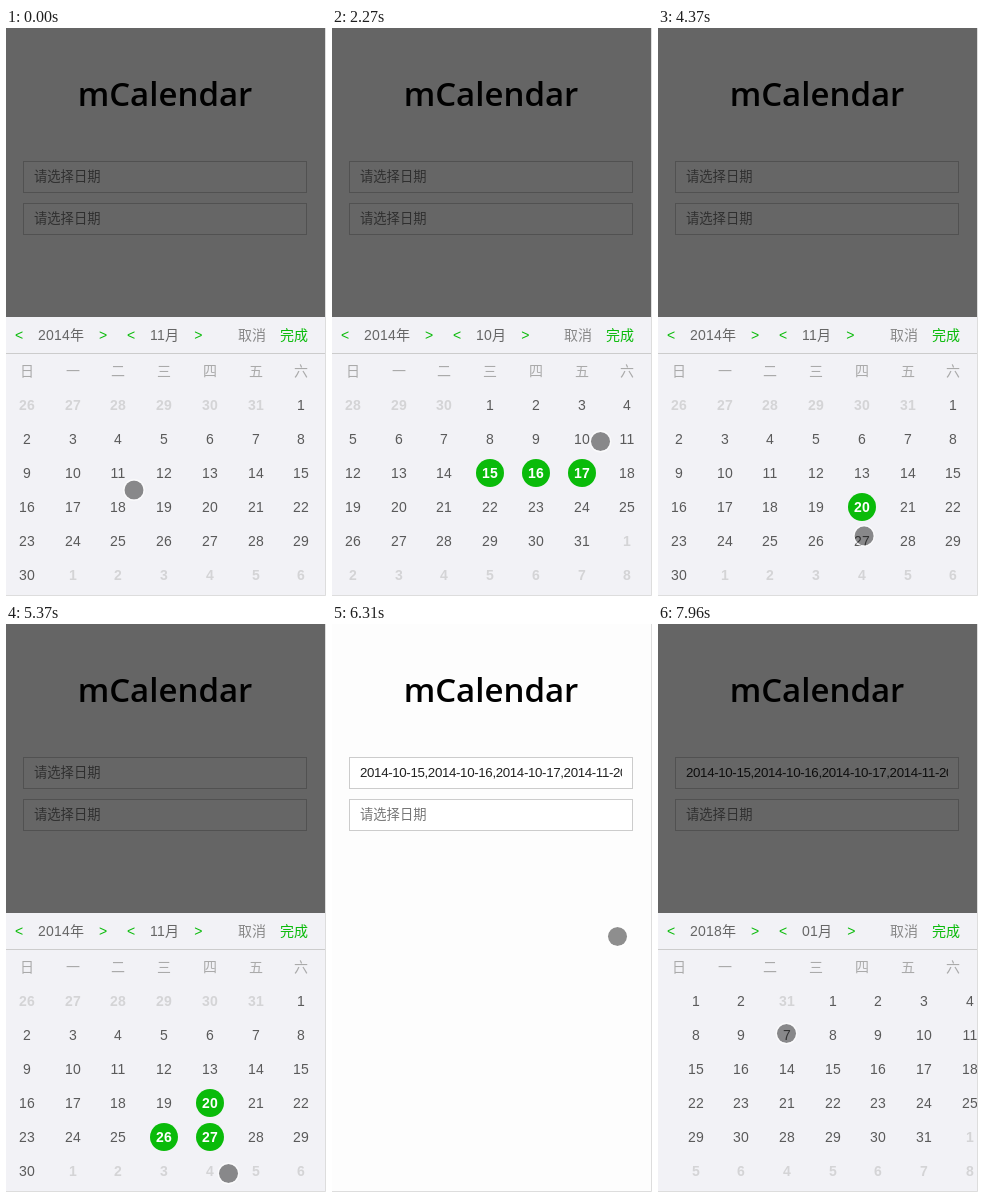
Recreate the animation shown at these times as an HTML page. Size 320x568 px, loop 8000 ms.

```html
<!DOCTYPE html>
<html lang="zh-CN">
<head>
<meta charset="utf-8">
<title>mCalendar</title>
<style>
  html, body { margin: 0; width: 100%; height: 100%; overflow: hidden; background: #fdfdfd; }
  svg { display: block; width: 320px; height: 568px; }
  text { font-family: "Liberation Sans", "Noto Sans CJK SC", "Noto Sans CJK", sans-serif; font-size: 14px; fill: #666; }
  .title { font: 600 33px "Open Sans", "Noto Sans", sans-serif; text-anchor: middle; fill: #000; }
  .field rect { fill: #fff; stroke: #ccc; }
  .field text { font-size: 13.3px; fill: #757575; }
  .field .value { letter-spacing: -.35px; fill: #222; }
  .digits { letter-spacing: .2px; }
  .go { fill: #0abb0a; }
  .week text { fill: #aaa; text-anchor: middle; }
  .day { fill: #5a5a5a; text-anchor: middle; letter-spacing: .2px; }
  .other { fill: #d4d4d6; font-weight: 700; }
  .picked { fill: #fff; font-weight: 700; }
  .dot { fill: #0abb0a; }
</style>
</head>
<body>
<svg viewBox="0 0 320 568">
  <defs><clipPath id="inner"><rect x="28" y="134" width="262" height="30"/></clipPath></defs>
  <rect width="320" height="568" fill="#fdfdfd"/>
  <text class="title" x="159" y="78">mCalendar</text>
  <g class="field">
    <rect x="17.5" y="133.5" width="283" height="31"/>
    <rect x="17.5" y="175.5" width="283" height="31"/>
    <g clip-path="url(#inner)"><text id="first" x="28" y="153"></text></g>
    <text x="28" y="195">请选择日期</text>
  </g>
  <g id="sheet">
    <rect width="320" height="568" fill="#000" fill-opacity=".6"/>
    <rect y="289" width="320" height="279" fill="#f2f2f6"/>
    <path d="M0 325.5H320" stroke="#ccc"/>
    <text class="go" x="9" y="312">&lt;</text>
    <text id="year" class="digits" x="32" y="312"></text>
    <text class="go" x="93" y="312">&gt;</text>
    <text class="go" x="121" y="312">&lt;</text>
    <text class="digits" x="144" y="312"><tspan id="month"></tspan><tspan class="go" dx="15">&gt;</tspan></text>
    <text x="232" y="312" style="fill: #888">取消</text>
    <text class="go" x="274" y="312" font-weight="500">完成</text>
    <g class="week" id="week"></g>
    <g id="pages"></g>
  </g>
  <g id="cursor">
    <circle r="9.6" fill="#000" fill-opacity=".44"/>
    <circle r="10.2" fill="none" stroke="#fff" stroke-opacity=".6" stroke-width="1.4"/>
  </g>
  <path d="M319.5 0V567.5H0" fill="none" stroke="#ddd"/>
</svg>
<script>
const LOOP = 8000, WIDTH = 320, CLOSE = 6310, REOPEN = 7140;
const $ = id => document.getElementById(id);
const colX = i => Math.floor(21.5 + 45.7 * i);
const rowY = i => 377 + 34 * i;
const clamp = p => Math.min(1, Math.max(0, p));
const ease = p => p * p * (3 - 2 * p);

// Pointer stops: time, x, y; it eases from one to the next.
const stops = [
  [0, 128, 462], [600, 235, 452], [1200, 163, 441.5], [1700, 254, 445], [2270, 268.5, 413.5],
  [2700, 150, 415], [3300, 233.5, 448.5], [4100, 207, 480], [4450, 206, 512], [4790, 162, 518],
  [5070, 162, 518], [5370, 222.5, 549.5], [6030, 287, 312], [CLOSE, 285.5, 312.5],
  [6860, 196, 197], [7410, 222, 385], [7800, 222, 385], [7960, 128.5, 409.5]
];

function pointer(t) {
  const i = stops.findIndex(s => s[0] > t);
  if (i < 0) return stops[stops.length - 1].slice(1);
  const [t0, x0, y0] = stops[i - 1], [t1, x1, y1] = stops[i];
  const p = ease((t - t0) / (t1 - t0));
  return [x0 + (x1 - x0) * p, y0 + (y1 - y0) * p];
}

function add(parent, tag, attrs, text) {
  const el = document.createElementNS("http://www.w3.org/2000/svg", tag);
  for (const k in attrs) el.setAttribute(k, attrs[k]);
  if (text !== undefined) el.textContent = text;
  return parent.appendChild(el);
}

const show = (el, on) => el.setAttribute("display", on ? "inline" : "none");

// picks maps a day of the month to the time it is tapped
function addMonth(year, month, picks = {}) {
  const g = add($("pages"), "g", {});
  const lead = new Date(year, month - 1, 1).getDay();
  const marks = [];
  for (let i = 0; i < 42; i++) {
    const date = new Date(year, month - 1, 1 - lead + i), day = date.getDate();
    const own = date.getMonth() === month - 1;
    const x = colX(i % 7), y = rowY(Math.floor(i / 7));
    const time = own && picks[day];
    const dot = time && add(g, "circle", { class: "dot", cx: x, cy: y, r: 14 });
    const label = add(g, "text", { class: own ? "day" : "day other", x, y: y + 5 }, day);
    if (time) marks.push({ dot, label, time });
  }
  return { g, year, month, marks };
}

[..."日一二三四五六"].forEach((c, i) => add($("week"), "text", { x: colX(i), y: 348 }, c));
const oct = addMonth(2014, 10, { 15: 1140, 16: 1450, 17: 1980 });
const nov = addMonth(2014, 11, { 20: 4030, 27: 4480, 26: 5060 });
const dec = addMonth(2017, 12), jan = addMonth(2018, 1);
const months = [oct, nov, dec, jan];

function place(page, x) {
  show(page.g, true);
  page.g.setAttribute("transform", `translate(${x})`);
}

function setHead({ year, month }) {
  $("year").textContent = year + "年";
  $("month").textContent = String(month).padStart(2, "0") + "月";
}

function draw(t) {
  $("cursor").setAttribute("transform", `translate(${pointer(t)})`);

  const done = t >= CLOSE;
  $("first").textContent = done
    ? "2014-10-15,2014-10-16,2014-10-17,2014-11-20,2014-11-26,2014-11-27" : "请选择日期";
  $("first").setAttribute("class", done ? "value" : "");
  show($("sheet"), !done || t >= REOPEN);

  months.forEach(m => show(m.g, false));
  if (done) {
    const shift = -212 * clamp((t - 7800) / 160);
    place(dec, shift);
    place(jan, shift + WIDTH);
    setHead(t >= 7900 ? jan : dec);
    return;
  }
  const page = t >= 680 && t < 2850 ? oct : nov;
  place(page, 0);
  setHead(page);
  for (const { dot, label, time } of page.marks) {
    show(dot, t >= time);
    label.setAttribute("class", t >= time ? "day picked" : "day");
  }
}

const start = performance.now();
function frame() {
  draw((performance.now() - start) % LOOP);
  requestAnimationFrame(frame);
}
frame();
</script>
</body>
</html>
```
